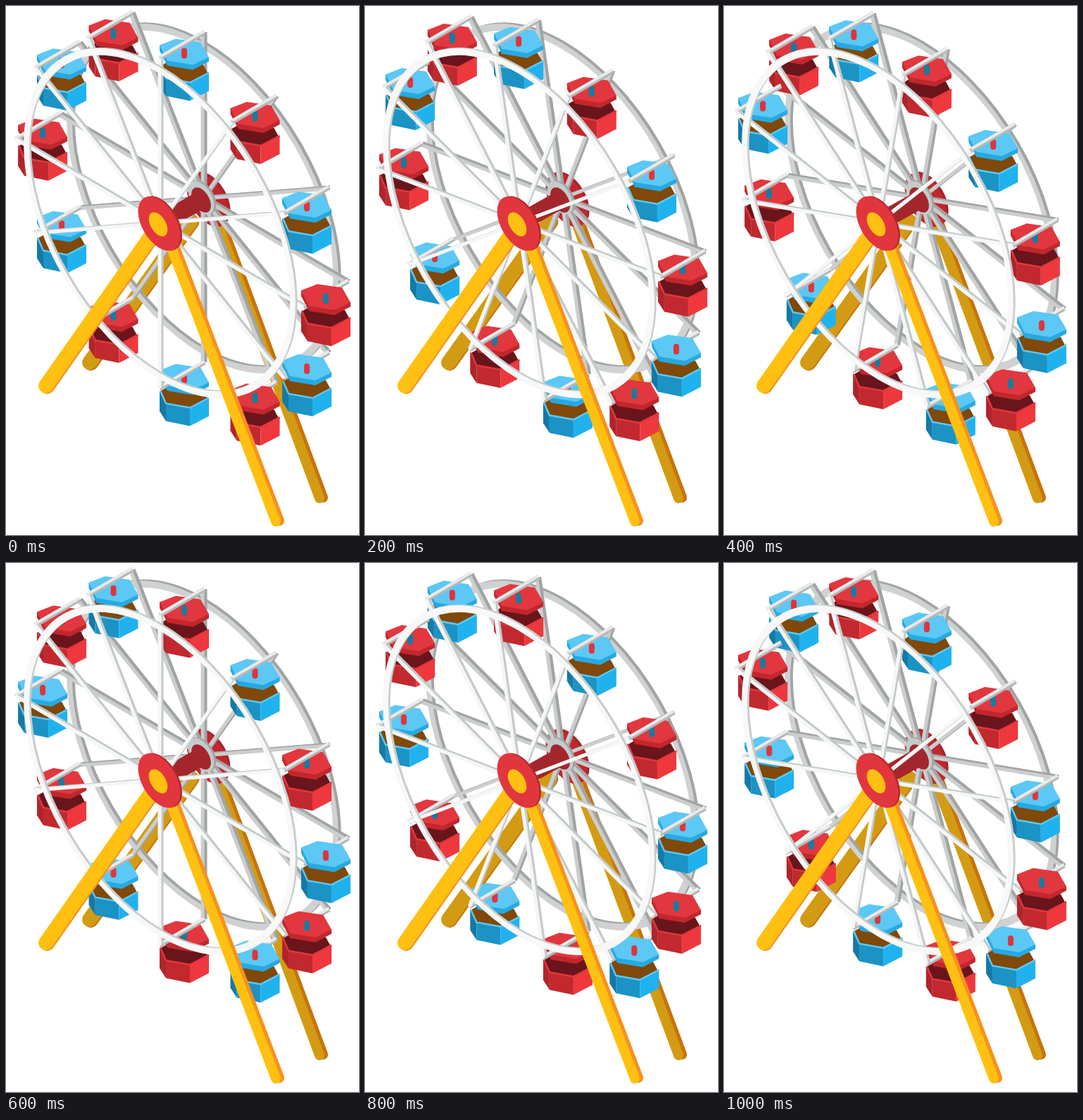
An HTML page with a canvas that plays this animation: 501x750 px, repeating every 1.2 s.

```html
<!DOCTYPE html>
<html lang="en">
<head>
<meta charset="utf-8">
<title>Ferris wheel</title>
<style>
html, body { margin: 0; width: 100%; height: 100%; overflow: hidden; background: #fff; }
canvas { display: block; }
</style>
</head>
<body>
<canvas id="stage" width="501" height="750"></canvas>
<script>
const ctx = document.getElementById('stage').getContext('2d');
const FRONT = [218, 308], REAR = [279, 273], BEAM_END = [282, 271], CABINS = [218, 277];
const STEP = 200, STEPS = 6, TURN = 10;

const RED = { roof: '#e2373e', edge: '#c1272d', side: '#b0242b', front: '#c1292f', right: '#ee383e',
  inside: '#6a151b', peg: '#1b7a9e' };
const BLUE = { roof: '#5bc8f5', edge: '#27a9e0', side: '#1579a6', front: '#1b93c5', right: '#20b2ee',
  inside: '#804809', peg: '#e0343b' };

function poly(color, ...p) {
  ctx.fillStyle = color;
  ctx.beginPath();
  for (let i = 0; i < p.length; i += 2) ctx.lineTo(p[i], p[i + 1]);
  ctx.fill();
}

function line(color, width, cap, ...p) {
  ctx.strokeStyle = color;
  ctx.lineWidth = width;
  ctx.lineCap = cap;
  ctx.beginPath();
  for (let i = 0; i < p.length; i += 2) ctx.lineTo(p[i], p[i + 1]);
  ctx.stroke();
}

// Circle in the slanted plane of the wheel; a width makes it a ring
function circle(color, x, y, r, width) {
  ctx.save();
  ctx.transform(204, 119, 0, 234, x, y);
  ctx.beginPath();
  ctx.arc(0, 0, r, 0, 7);
  ctx.fillStyle = ctx.strokeStyle = color;
  ctx.lineWidth = width || 0;
  if (width) ctx.stroke(); else ctx.fill();
  ctx.restore();
}

// Point on the wheel, counter-clockwise from the top
function tip([x, y], deg, r = 1) {
  const a = deg * Math.PI / 180, s = r * Math.sin(a), c = r * Math.cos(a);
  return [x - 204 * s, y - 119 * s - 234 * c];
}

function leg(face, shade, width, dx, dy, x1, y1, x2, y2) {
  line(shade, width, 'round', x1 + dx, y1 + dy, x2 + dx, y2 + dy);
  line(face, width, 'round', x1, y1, x2, y2);
}

function spokes([x, y], turn, face, shade, depth) {
  for (let i = 0; i < 12; i++) {
    const [tx, ty] = tip([x, y], turn + i * 30);
    line(shade, 5, 'butt', x + depth, y - depth / 2, tx + depth, ty - depth / 2);
    line(face, 5, 'butt', x, y, tx, ty);
  }
}

function rim([x, y], face, shade, depth) {
  circle(shade, x + depth, y - depth / 2, 0.926, 0.036);
  circle(face, x, y, 0.926, 0.038);
}

function beam(deg) {
  const [x1, y1] = tip(FRONT, deg), [x2, y2] = tip(BEAM_END, deg);
  line('#b4b8b7', 7, 'butt', x1, y1, x2, y2);
  line('#e9eaea', 4, 'butt', x1 - 0.5, y1 - 1.5, x2 - 0.5, y2 - 1.5);
}

function cabin(deg, c) {
  ctx.save();
  ctx.translate(...tip(CABINS, deg, 0.985));
  poly(c.inside, 2, 38, 20, 28, 62, 37, 68, 48, 43, 62, 9, 56);
  poly(c.side, 0, 37, 9, 56, 9, 81, 0, 67);
  poly(c.front, 9, 56, 43, 62, 43, 88, 9, 81);
  poly(c.right, 43, 62, 70, 48, 70, 74, 43, 88);
  line(c.roof, 2.5, 'butt', 1, 38, 9, 56, 43, 62, 70, 48);
  poly(c.edge, 0, 9, 70, 26, 70, 32, 47, 44, 11, 38, 0, 17);
  poly(c.roof, 0, 9, 23, 0, 58, 5, 70, 26, 47, 37, 11, 31);
  line(c.peg, 8, 'round', 35, 17, 35, 24);
  ctx.restore();
}

function draw(step) {
  const turn = step * TURN;
  ctx.clearRect(0, 0, 501, 750);

  leg('#d39b13', '#c8780c', 21, 2, 1, 262, 305, 118.5, 505.5);
  leg('#d39b13', '#c8730c', 14, 5, -1, 297, 300, 445, 698);
  circle('#a8232b', 289, 273, 0.145);
  circle('#c1272d', 286, 275, 0.145);
  rim(REAR, '#d0d1d1', '#a0a5a4', 4);
  spokes(REAR, turn, '#cccdcd', '#a0a4a3', 4);
  circle('#a0a5a4', 280, 271, 0.09);
  circle('#c4cbca', 277, 272, 0.09);

  for (let i = 0; i < 12; i++) {
    const deg = turn + 120 + i * 30;
    const colors = i % 2 ? RED : BLUE;
    // Cabins at the lower right hide their beam
    const lowRight = deg % 360 > 200 && deg % 360 <= 270;
    if (lowRight) beam(deg);
    cabin(deg, colors);
    if (!lowRight) beam(deg);
  }

  line('#a3262d', 26, 'butt', ...FRONT, 277, 275);
  circle('#a3262d', 277, 275, 0.068);
  spokes(FRONT, turn, '#f5f6f6', '#c3cac9', 3);
  rim(FRONT, '#f8f8f8', '#c6cdcc', 3);
  leg('#ffc012', '#f7901e', 21, 2, 1, 208, 323, 56.5, 538.5);
  leg('#ffc012', '#f7901e', 14, 5, -1, 234, 341, 383, 731);
  circle('#b5262d', 220, 308, 0.147);
  circle('#e1363d', 217.5, 308.5, 0.147);
  circle('#ffc012', 216, 309.5, 0.065);
}

const start = performance.now();
function tick() {
  draw(Math.floor((performance.now() - start) / STEP) % STEPS);
  requestAnimationFrame(tick);
}
tick();
</script>
</body>
</html>
```
